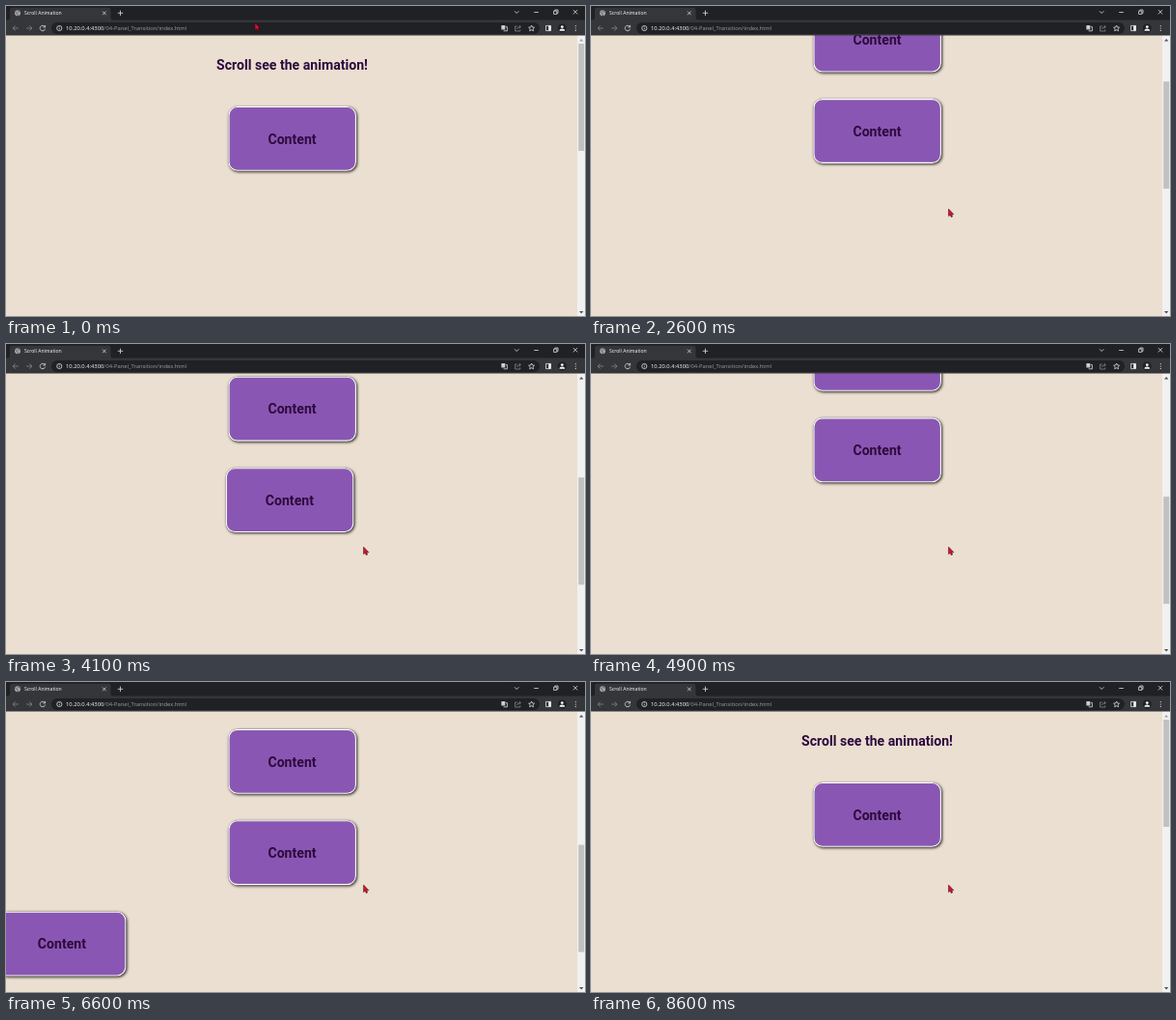
An HTML page that plays this animation: 600x321 px, repeating every 8700 ms.

```html
<!DOCTYPE html>
<html lang="en">
<head>
<meta charset="utf-8">
<title>Scroll Animation</title>
<style>
  html, body { margin: 0; width: 100%; height: 100%; overflow: hidden; background: #ebdfd1; }
  svg { display: block; width: 100%; height: 100%; }
  .page text { font: bold 14.1px Roboto, sans-serif; fill: #2d0a3d; text-anchor: middle; }
  .card { filter: drop-shadow(0 0 .6px rgba(0, 0, 0, .6)) drop-shadow(1.3px 1.3px 1.6px rgba(0, 0, 0, .85)); }
  .ui text { font-family: "Open Sans", sans-serif; }
  .line { fill: none; stroke: #dcdee1; stroke-width: .8; }
  .dim { stroke: #85888d; }
</style>
</head>
<body>
<svg viewBox="0 0 600 321" preserveAspectRatio="none">
  <rect width="600" height="321" fill="#ebdfd1"/>
  <g class="page" id="page">
    <text x="296.5" y="66">Scroll see the animation!</text>
  </g>

  <g class="scrollbar">
    <rect x="592" y="30.5" width="8" height="290.5" fill="#f1f1f1"/>
    <rect id="thumb" x="593.2" y="39" width="6" height="111" fill="#c1c1c1"/>
    <path id="up" d="M594 36.4l2.2-2.4 2.2 2.4z"/>
    <path id="down" d="M594 316l2.2 2.4 2.2-2.4z"/>
  </g>

  <g class="ui">
    <rect width="600" height="15" fill="#202124"/>
    <path d="M0 14.5H2Q4 14.5 4 12V4Q4 1.8 6.5 1.8H106Q108.5 1.8 108.5 4V12Q108.5 14.5 111 14.5H600V30.5H0Z" fill="#35363a"/>
    <circle cx="12" cy="7.3" r="3" fill="#a4a7ab"/>
    <path d="M9.6 6.2q2 .4 2.2 2t1.2 1.6M11.5 4.6q.6 1.6 2.8 1.4" fill="none" stroke="#4a4c50" stroke-width=".7"/>
    <text x="19" y="9.2" font-size="5.1" fill="#fff">Scroll Animation</text>
    <path class="line" d="M100 5.6l3.6 3.6m0-3.6l-3.6 3.6M115.8 7.3h5.4m-2.7-2.7v5.4"/>
    <path class="line" d="M527 5.3l2.2 2.2 2.2-2.2M547.2 6.5h4.6M587.8 4l4.4 4.4m0-4.4l-4.4 4.4"/>
    <path class="line" d="M567.6 5.2h3.2v3.2h-3.2zM568.8 5V4h3.2v3.4h-1"/>

    <path class="line dim" d="M12.8 23H7.2m2.5-2.6L7.1 23l2.6 2.6M21.2 23h5.6m-2.5-2.6l2.6 2.6-2.6 2.6"/>
    <path class="line" d="M40 21.2a2.7 2.7 0 1 0 .6 2.4M40.6 19.9v2.1h-2.1"/>
    <rect x="47" y="17" width="506" height="12" rx="6" fill="#202124"/>
    <circle class="line" cx="55.3" cy="23" r="2.6"/>
    <path class="line" d="M55.3 22.6v1.7m0-3v.6"/>
    <text x="62" y="25.1" font-size="5.8" fill="#9aa0a6"><tspan fill="#fff">10.20.0.4:4300</tspan>/04-Panel_Transition/index.html</text>
    <rect x="513.3" y="20" width="4" height="4.6" rx=".5" fill="#c4c7ca"/>
    <path class="line" d="M515.6 25.8h3.8v-4.2h-1.6M514.3 21.5h2m-1 0v1.6"/>
    <path class="line dim" d="M529.6 21h-2v5h5.2v-1.6M529.4 24q.4-2.4 3.6-2.4m-1.2-1.6l1.6 1.6-1.6 1.6"/>
    <path class="line" d="M544.6 20l.9 2 2.1.2-1.6 1.5.5 2.1-1.9-1.1-1.9 1.1.5-2.1-1.6-1.5 2.1-.2z"/>
    <path class="line" d="M559.5 20.4h5v5.2h-5z"/>
    <rect x="562.2" y="20.4" width="2.4" height="5.2" fill="#f1f3f4"/>
    <circle cx="576.3" cy="23" r="4.5" fill="#202124"/>
    <circle cx="576.3" cy="21.6" r="1.4" fill="#f1f3f4"/>
    <path d="M573.5 25.8q0-2.2 2.8-2.2t2.8 2.2z" fill="#f1f3f4"/>
    <path d="M590.3 20.6v.01m0 2.4v.01m0 2.4v.01" stroke="#dcdee1" stroke-width="1.2" stroke-linecap="round"/>
  </g>

  <path id="cursor" d="M0 0V7.4L1.6 6 2.7 8.4 4 7.8 3 5.5H5.2Z" fill="#e0102c" stroke="#3a0a12" stroke-width=".6"/>
</svg>

<script>
const LOOP = 8700;
const TICK = 51.8, TICK_MS = 200, MAX_SCROLL = 427;
const CARDS = 7, FIRST_TOP = 104, PITCH = 94.4;
const TRIGGER = 168;            // a card is shown while its top is above this line
const SLIDE = 528, SLIDE_MS = 500;
const WHEEL_DOWN = [1710, 2420, 2930, 3290, 3585, 4435, 5135, 5425, 5720];
const WHEEL_UP = [6383, 6478, 6576, 6680, 7010, 7313, 7345, 7438, 7510];

const $ = id => document.getElementById(id);
const clamp01 = v => Math.min(1, Math.max(0, v));
const smooth = p => (p = clamp01(p), p * p * (3 - 2 * p));

// The CSS "ease" curve, cubic-bezier(.25, .1, .25, 1)
function ease(x) {
  if (x <= 0) return 0;
  if (x >= 1) return 1;
  const bezier = (u, a, b) => 3 * a * u * (1 - u) ** 2 + 3 * b * u * u * (1 - u) + u ** 3;
  let low = 0, high = 1;
  for (let i = 0; i < 20; i++) {
    const mid = (low + high) / 2;
    if (bezier(mid, .25, .25) < x) low = mid; else high = mid;
  }
  return bezier(low, .1, 1);
}

const wheel = (ticks, t) =>
  ticks.reduce((sum, start) => sum + TICK * smooth((t - start) / TICK_MS), 0);
const scrollAt = t =>
  Math.max(0, Math.min(MAX_SCROLL, wheel(WHEEL_DOWN, t)) - wheel(WHEEL_UP, t));

function makeCard(index) {
  const top = FIRST_TOP + PITCH * index;
  const shownAt = t => top - scrollAt(t) < TRIGGER;
  let enter = Infinity, leave = Infinity;
  if (shownAt(0)) enter = -SLIDE_MS;
  for (let t = 0; t < LOOP; t++) {
    if (enter === Infinity && shownAt(t)) enter = t;
    if (enter < t && leave === Infinity && !shownAt(t)) leave = t;
  }
  const node = document.createElementNS("http://www.w3.org/2000/svg", "g");
  node.innerHTML = `
    <rect class="card" x="231" y="${top + .5}" width="131.4" height="65.8" rx="8.8"
      fill="#8a56b3" stroke="#fff" stroke-width="1.1"/>
    <text x="296.5" y="${top + 38.6}">Content</text>`;
  $("page").append(node);
  return { node, enter, leave, side: index % 2 ? -1 : 1 };
}

const cards = Array.from({ length: CARDS }, (_, i) => makeCard(i));

function draw(t) {
  const scroll = scrollAt(t);
  $("page").setAttribute("transform", `translate(0 ${-scroll})`);
  $("thumb").setAttribute("y", 39 + scroll / 2.61);
  $("up").setAttribute("fill", scroll < .5 ? "#a3a3a3" : "#505050");
  $("down").setAttribute("fill", scroll > MAX_SCROLL - .5 ? "#a3a3a3" : "#505050");

  for (const { node, enter, leave, side } of cards) {
    const hidden = 1 - ease((t - enter) / SLIDE_MS) + ease((t - leave) / SLIDE_MS);
    node.setAttribute("transform", `translate(${side * SLIDE * hidden} 0)`);
    node.setAttribute("visibility", hidden > .99 ? "hidden" : "visible");
  }

  const move = smooth((t - 50) / 800);
  $("cursor").setAttribute("transform", `translate(${258 + 112.6 * move} ${17.5 + 192.7 * move})`);
}

const start = performance.now();
function frame() {
  draw((performance.now() - start) % LOOP);
  requestAnimationFrame(frame);
}
frame();
</script>
</body>
</html>
```
